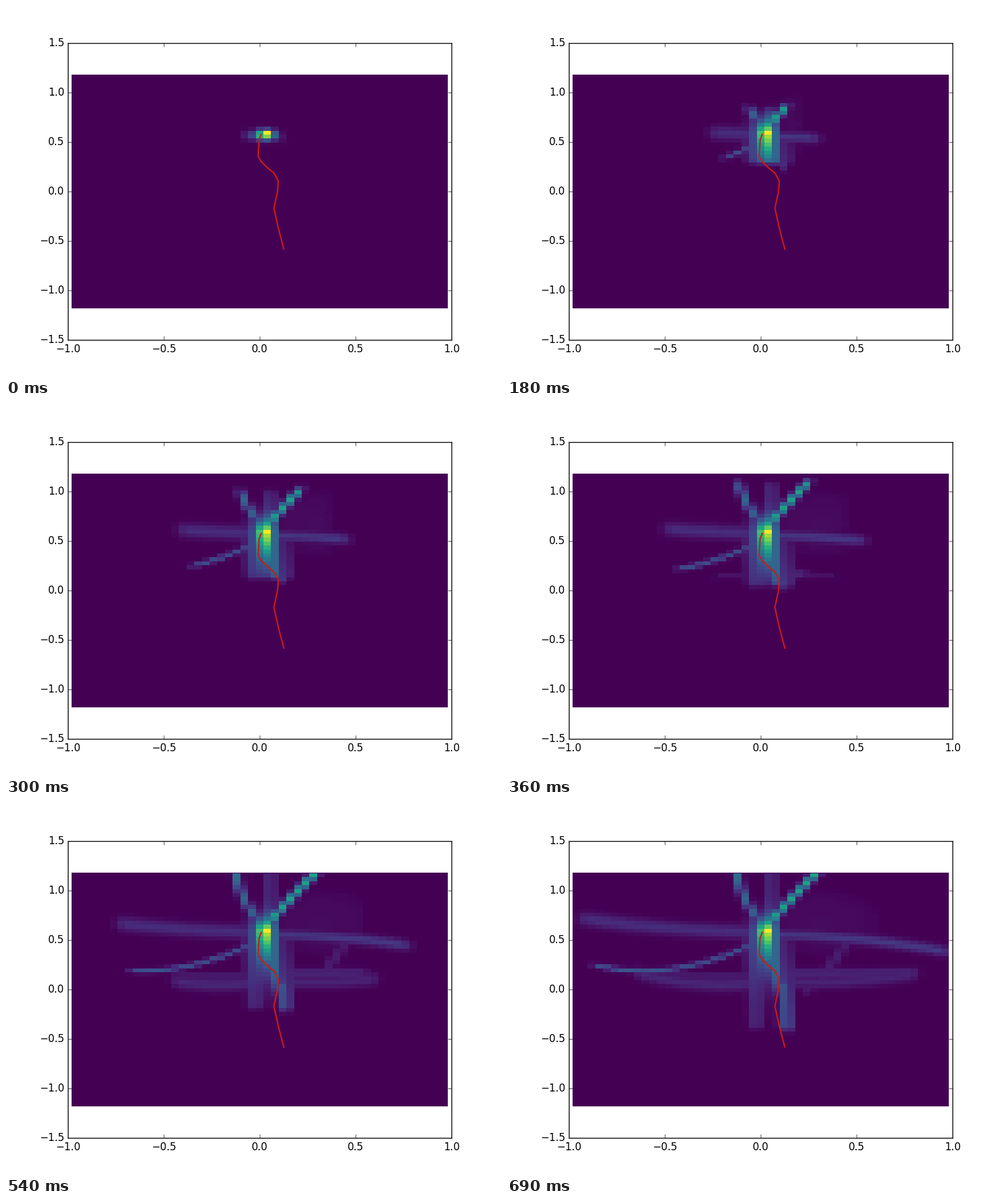
A matplotlib script that plays this animation: 800 by 600 pixels, repeating every 720 ms.

```python
import numpy as np
import matplotlib.pyplot as plt
from matplotlib.animation import FuncAnimation
from matplotlib.patches import Rectangle

FRAMES, INTERVAL = 24, 30
CELL = 0.04
SOURCE_ROW = 15
COLS, ROWS = np.meshgrid(np.arange(-24, 25), np.arange(-29, 30))

plt.rcParams.update({
    "font.family": "DejaVu Sans", "font.size": 12,
    "text.hinting": "force_autohint", "ytick.alignment": "center",
    "axes.linewidth": 1.0,
    "figure.facecolor": "white", "savefig.facecolor": "white",
})

layers = []  # (values, arrival times), stacked along the first axis


def bell(x, width):
    return np.exp(-(x / width) ** 2 / 2)


def beam(start, bend, end, times, values, sx=0.4, sy=0.6):
    """Streak along a quadratic curve in (column, row) space."""
    t = np.linspace(0, 1, 90)[:, None, None]
    c, r = ((1 - t) ** 2 * a + 2 * t * (1 - t) * b + t ** 2 * d
            for a, b, d in zip(start, bend, end))
    arrival = times[0] + t * (times[1] - times[0])
    value = values[0] + t * (values[1] - values[0])
    layers.append((value * bell(COLS - c, sx) * bell(ROWS - r, sy), arrival))


def column(col, peak, down, power=1.5, base=0.0, up=3.0, top=0.0):
    """Vertical bar that spreads from the source row and fades with distance."""
    d = ROWS - SOURCE_ROW
    above = top + (peak - top) * np.exp(-(np.abs(d) / up) ** 1.5)
    below = base + (peak - base) * np.exp(-(np.abs(d) / down) ** power)
    value = np.where(d > 0, above, below) * (COLS == col)
    arrival = np.where(d >= 0, d, -d - 1.3)
    layers.append((value[None], arrival[None]))


def lobe(sign, centre, low, bend, delay, value):
    """Sagging wing with a brighter lower edge."""
    out = sign * COLS
    floor = low + bend * (out - centre) ** 2
    edge = bell(ROWS - floor, 1.1)
    fill = 0.6 * ((ROWS > floor) & (ROWS <= 4))
    wing = value * np.maximum(edge, fill) * (out > 1) * (floor < 5)
    arrival = np.maximum(out + delay, 16 - ROWS)
    layers.append((wing[None], arrival[None]))


def glow(col, value, sx, sy):
    spot = value * bell(COLS - col, sx) * bell(ROWS - SOURCE_ROW, sy)
    layers.append((spot[None], np.full((1, 1, 1), -2)))


# Source and the bars around it
glow(1, 1, 0.25, 0.25)
glow(0.7, 0.8, 0.9, 0.6)
column(-2, 0.08, 14)
column(-1, 0.22, 13, power=2, base=0.09, up=4)
column(0, 0.7, 7, base=0.08)
column(1, 0.9, 8, top=0.1)
column(2, 0.33, 15, power=8, base=0.03, up=4, top=0.07)
beam((3, 14), (3, 4), (3, 1), (0, 13), (0.08, 0.18), sx=0.3)
beam((3, 1), (3, -5), (3, -11), (12.5, 24.5), (0.25, 0.2), sx=0.3)
beam((4, 13), (4, 1), (4, -11), (1, 24.5), (0.04, 0.18), sx=0.3)

# Rising streaks
beam((1, 16.5), (4.1, 23.5), (7.3, 29.6), (1.5, 14.6), (0.55, 0.58))
beam((0, 17), (-2.6, 23), (-3.1, 30), (2, 15), (0.3, 0.35))

# Side bands, then the thin streak and the one falling on the right
beam((0, 14.6), (-12, 14.9), (-24, 18.2), (0, 24), (0.13, 0.13), sy=1.2)
beam((1, 13.9), (12.5, 13.9), (24, 9.7), (0, 23), (0.16, 0.17), sy=0.9)
beam((-1, 11.6), (-12, 1.5), (-22, 6.5), (3, 24), (0.23, 0.28), sy=0.42)
beam((11, 12), (9.5, 6), (6, 0), (13, 23), (0.08, 0.09), sx=0.5, sy=0.9)

# Lower wings
lobe(-1, 5, 1.3, 0.025, 7, 0.11)
lobe(1, 7, 2, 0.012, 3, 0.1)
beam((3, 4.4), (11, 4.4), (20, 4.6), (10, 23), (0.12, 0.11), sy=0.7)

# Faint haze on the upper right
reach = ((COLS - 8) / 8.2) ** 2 + ((ROWS - 17) / 8.6) ** 2
haze = 0.028 * np.sqrt(np.clip(1 - reach, 0, 1)) * (COLS > 2)
delay = np.where(COLS > 11, 12 + (COLS - 11) * 2.5, COLS + 1)
layers.append((haze[None], delay[None]))


def density(n):
    grid = np.zeros(COLS.shape)
    for value, arrival in layers:
        gate = np.clip((n - arrival + 1.2) / 1.6, 0, 1)
        grid = np.maximum(grid, (value * gate).max(axis=0))
    return grid


fig, ax = plt.subplots(figsize=(8, 6), dpi=100)
fig.subplots_adjust(left=0.125, right=0.9, bottom=0.1, top=0.9)

half_w, half_h = 24.5 * CELL, 29.5 * CELL
field = Rectangle((-half_w, -half_h), 2 * half_w, 2 * half_h,
                  fc=plt.get_cmap("viridis")(0.0), ec="none", zorder=0)
ax.add_patch(field)

# A sub-pixel shift makes the cell edges snap to whole pixels
dx, dy = -0.0013, -0.005
image = ax.imshow(density(0), cmap="viridis", vmin=0, vmax=1, origin="lower",
                  interpolation="nearest", aspect="auto", zorder=1,
                  extent=(dx - half_w, dx + half_w, dy - half_h, dy + half_h))
image.set_clip_path(field)

path = np.array([(412.5, 207.5), (409, 217), (407.5, 243), (412, 251),
                 (424, 263), (433, 270), (440, 283), (439, 299),
                 (433, 327), (440, 359), (449, 393)])
ax.plot((path[:, 0] - 410) / 310, (300 - path[:, 1]) / 160,
        color="#cf1a14", lw=1.6, zorder=3)

ax.set_xlim(-1, 1)
ax.set_ylim(-1.5, 1.5)
ax.set_xticks(np.arange(-1, 1.1, 0.5))
ax.set_yticks(np.arange(-1.5, 1.6, 0.5))
ax.tick_params(direction="in", length=4, width=0.5, pad=4, top=True, right=True)


def update(n):
    image.set_data(density(n))
    return [image]


anim = FuncAnimation(fig, update, frames=FRAMES, interval=INTERVAL,
                     repeat=True, repeat_delay=0)
plt.show()
```
